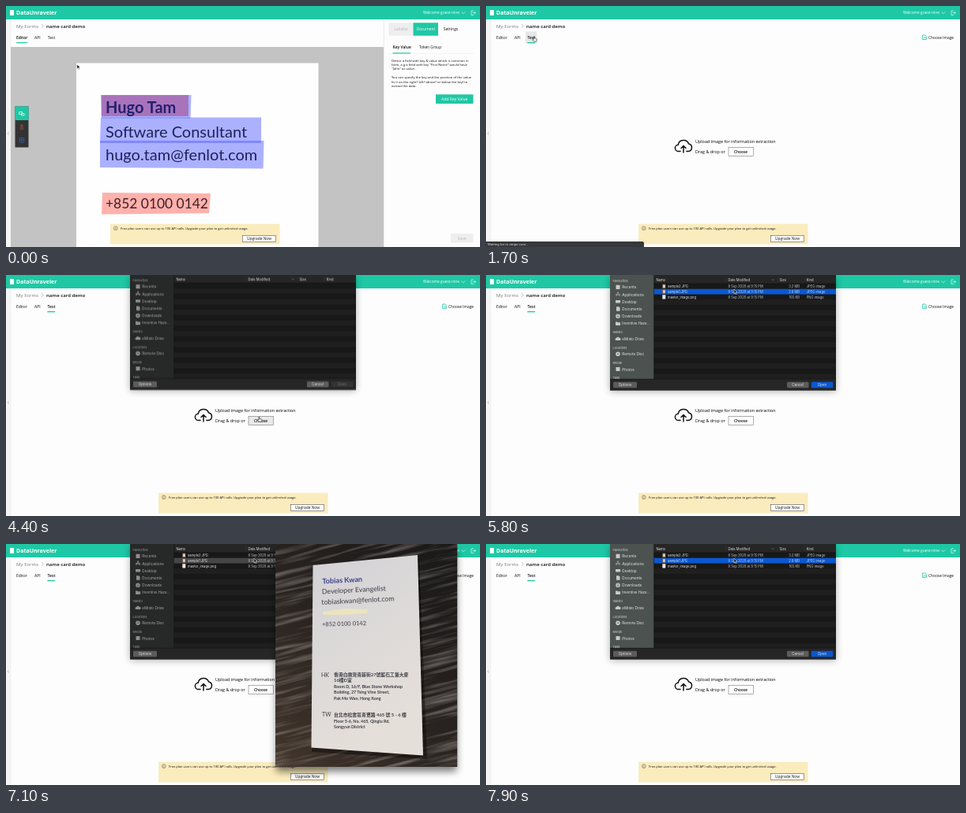
Recreate the animation shown at these times as an HTML page. Size 600x306 px, loop 8000 ms.

```html
<!DOCTYPE html>
<html lang="en">
<head>
<meta charset="utf-8">
<title>Form extraction demo</title>
<style>
html, body { margin: 0; width: 100%; height: 100%; overflow: hidden; background: #fdfdfd; }
svg { display: block; width: 100vw; height: 100vh; }
text { font: 5px "Open Sans", "Noto Sans", sans-serif; fill: #111; }
.b { font-weight: 600; }
.mid { text-anchor: middle; }
.end { text-anchor: end; }
.white { fill: #fff; }
.pale { fill: #b9b9b9; }
.hint { font-size: 4.17px; }
.note { font-size: 4.07px; }
.big { font-size: 5.42px; fill: #000; }
.line { fill: none; stroke-linecap: round; stroke-linejoin: round; }
.card text { font-family: Lato, "Noto Sans CJK TC", sans-serif; font-size: 20px; fill: #20215f; }
.dialog text { font-family: Inter, Roboto, sans-serif; font-size: 4.15px; fill: #e4e4e4; }
.dialog .side text { font-size: 4.7px; fill: inherit; }
.dialog .side .h { font-size: 3.9px; opacity: .85; }
.dialog .btn { font-size: 4.5px; text-anchor: middle; }
.photo text { font-family: Lato, "Noto Sans CJK TC", sans-serif; font-size: 8.8px; fill: #3c3c44; }
.photo .addr text { font-size: 5.35px; font-weight: 700; }
.photo .addr .zh { font-size: 5.85px; }
.photo .addr .tag { font-size: 7px; font-weight: 400; }

/* One loop is 8 s, so 1.25% is 100 ms. */
.step { animation: 8s step-end infinite; }
.glide { animation: 8s ease-in-out infinite; }
.editor { animation-name: editor; }
.test { animation-name: test; }
.status { animation-name: status; }
.dock { animation-name: dock; }
.tabhover { animation-name: tabhover; }
.choosehover { animation-name: choosehover; }
.banner { animation-name: banner; }
.dialog { animation-name: dialog; animation-timing-function: ease-out; }
.files { animation-name: files; }
.side { animation-name: side; }
.panel { animation-name: panel; }
.row { animation-name: row; }
.open { animation-name: open; }
.opentext { animation-name: opentext; }
.photo { animation-name: photo; transform-origin: 228px 21px; }
.cursor { animation-name: cursor; }
.arrow { animation-name: arrow; }
.hand { animation-name: hand; }
@keyframes editor { 0% { opacity: 1 } 21.25%, to { opacity: 0 } }
@keyframes test { 0% { opacity: 0 } 21.25%, to { opacity: 1 } }
@keyframes status { 0% { opacity: 0 } 21.25% { opacity: 1 } 30%, to { opacity: 0 } }
@keyframes dock { 0% { opacity: 0 } 38.75% { opacity: 1 } 52.5%, to { opacity: 0 } }
@keyframes tabhover { 0% { opacity: 0 } 16.25% { opacity: 1 } 32.5%, to { opacity: 0 } }
@keyframes choosehover { 0% { fill: #fff } 47.5% { fill: #e9e9e9 } 57.5%, to { fill: #fff } }
@keyframes banner { 0% { transform: translateX(-61px) } 21.25%, to { transform: none } }
@keyframes dialog {
  0%, 51.25% { transform: translateY(-160px) }
  55% { transform: translateY(-.7px) }
  56.25%, to { transform: none }
}
@keyframes files { 0% { opacity: 0 } 58.75%, to { opacity: 1 } }
@keyframes side { 0% { fill: #a6a9a8 } 68.75% { fill: #e6e8e7 } 85% { fill: #a6a9a8 } 97.5%, to { fill: #e6e8e7 } }
@keyframes panel { 0% { fill: #272929 } 68.75% { fill: #4b524f } 85% { fill: #272929 } 97.5%, to { fill: #4b524f } }
@keyframes row { 0% { fill: transparent } 68.75% { fill: #0a58d0 } 85% { fill: #464646 } 97.5%, to { fill: #0a58d0 } }
@keyframes open { 0% { fill: #333335 } 68.75% { fill: #0a58d0 } 85% { fill: #333335 } 97.5%, to { fill: #0a58d0 } }
@keyframes opentext { 0% { opacity: .35 } 68.75% { opacity: 1 } 85% { opacity: .35 } 97.5%, to { opacity: 1 } }
@keyframes photo {
  0%, 83.75% { transform: scale(.03); opacity: 0 }
  84.5% { opacity: 1 }
  86.25%, 93.75% { transform: none; opacity: 1 }
  95.5% { opacity: 1 }
  96.2%, to { transform: scale(.03); opacity: 0 }
}
@keyframes cursor {
  0%, 11.25% { transform: translate(89.8px, 74px) }
  16.25%, 31.25% { transform: translate(60.8px, 38.5px) }
  36.25%, 37.5% { transform: translate(240px, 139px) }
  43.75%, 45% { transform: translate(319.8px, 177.8px) }
  47.5%, 56.25% { transform: translate(320.4px, 180px) }
  66.25%, to { transform: translate(313.8px, 18px) }
}
@keyframes arrow { 0% { opacity: 1 } 16.25% { opacity: 0 } 32.5% { opacity: 1 } 47.5% { opacity: 0 } 57.5%, to { opacity: 1 } }
@keyframes hand { 0% { opacity: 0 } 16.25% { opacity: 1 } 32.5% { opacity: 0 } 47.5% { opacity: 1 } 57.5%, to { opacity: 0 } }
</style>
</head>
<body>
<svg viewBox="0 0 600 306">
<defs>
  <pattern id="stripes" x="212.5" y="11" width="20" height="13.5" patternUnits="userSpaceOnUse">
    <rect width="20" height="13.5" fill="#181818"/>
    <rect y="6.75" width="20" height="6.75" fill="#1f1f1f"/>
  </pattern>
  <linearGradient id="table" x1="0" y1="1" x2=".8" y2="0">
    <stop offset="0" stop-color="#43362c"/>
    <stop offset=".5" stop-color="#2a2421"/>
    <stop offset="1" stop-color="#1b1919"/>
  </linearGradient>
  <linearGradient id="paper" x2=".4" y2="1">
    <stop offset="0" stop-color="#d2d1d5"/>
    <stop offset=".5" stop-color="#dcd9d8"/>
    <stop offset="1" stop-color="#e5dfd9"/>
  </linearGradient>
  <linearGradient id="fade" x2="0" y2="1">
    <stop offset="0" stop-color="#000" stop-opacity="0"/>
    <stop offset="1" stop-color="#000" stop-opacity=".2"/>
  </linearGradient>
  <filter id="soft" x="-20%" y="-20%" width="140%" height="140%"><feGaussianBlur stdDeviation="5"/></filter>
  <filter id="grain" x="0" y="0" width="1" height="1">
    <feTurbulence type="fractalNoise" baseFrequency=".012 .22" numOctaves="3" seed="4"/>
    <feColorMatrix values="0 0 0 0 .47  0 0 0 0 .43  0 0 0 0 .4  2.4 0 0 0 -1.1"/>
  </filter>
  <clipPath id="frame"><rect x="341" width="230.5" height="283"/></clipPath>
  <clipPath id="sideclip"><rect x="157" width="56" height="132"/></clipPath>
</defs>

<!-- page shell -->
<rect width="600" height="306" fill="#fdfdfd"/>
<rect y="17" width="6" height="289" fill="#f5f5f5"/>
<path d="M6 17V306" stroke="#e9e9e9" stroke-width=".5"/>
<path class="line" d="M3.4 160.6 2.2 162 3.4 163.4" stroke="#888" stroke-width=".5"/>
<rect width="600" height="17" fill="#1fc8a5"/>
<rect class="white" x="5" y="5" width="5" height="7"/>
<text class="white" x="13" y="11.4" style="font-size:7px;font-weight:700">DataUnraveler</text>
<text class="white" x="528" y="10.4" style="font-size:4.85px">Welcome guest-nine</text>
<path class="line" d="M576.8 7.8 578.8 9.8 580.8 7.8" stroke="#fff" stroke-width=".6"/>
<path class="line" d="M591.5 6H589V11.5H591.5M591 8.7H594.3M593 7.3 594.4 8.7 593 10.1" stroke="#fff" stroke-width=".6"/>
<text x="13" y="27.5" style="font-size:6.1px;fill:#777">My Forms</text>
<path class="line" d="M45.2 23.4 47.2 25.5 45.2 27.6" stroke="#999" stroke-width=".6"/>
<text class="b" x="51" y="27.5" style="font-size:6.05px">name card demo</text>
<rect class="step tabhover" x="50" y="32.3" width="14.3" height="15" fill="#e7e7e7"/>
<text x="36" y="41.7">API</text>

<!-- editor -->
<g class="step editor">
  <text class="b" x="13" y="41.7">Editor</text>
  <text x="52.8" y="41.7">Test</text>
  <rect x="13" y="46" width="14" height="1.2" fill="#1fc8a5"/>
  <rect x="6" y="52" width="472" height="254" fill="#c3c3c3"/>
  <rect x="89" y="72.5" width="306.5" height="233.5" fill="#fefefe"/>
  <g class="card">
    <g fill="rgb(77,90,255)" fill-opacity=".47">
      <path d="M120 113H234.5L233.5 142.5H121Z"/>
      <path d="M120 141.5H323V174H119Z"/>
      <path d="M119 171H326.5L325.5 206.5 119 205Z"/>
    </g>
    <path d="M121.5 113.5H230.5V139.5H121Z" fill="#a873bb" stroke="#76508e" stroke-width=".5" stroke-dasharray="1.5 1"/>
    <path d="M122 237 259 238 257 263 121 264.5Z" fill="#ffb1ac"/>
    <text x="126" y="136" style="font-weight:700;fill:#23206f">Hugo Tam</text>
    <text x="126" y="166.5">Software Consultant</text>
    <text x="126" y="195.5">hugo.tam@fenlot.com</text>
    <text x="126" y="257" style="font-size:17.4px;fill:#3b2026">+852 0100 0142</text>
  </g>
  <rect x="11.5" y="127.5" width="17" height="52" fill="#333"/>
  <rect x="11.5" y="127.5" width="17" height="17.5" fill="#1fc8a5"/>
  <g class="line" stroke-width=".7">
    <path d="M17 134.5H20.5V137.5H17ZM20 136.5H23V139H20Z" stroke="#fff"/>
    <path d="M18.5 156 19 153H21L21.5 156ZM19 151.5A1 1 0 0 1 21 151.5 1 1 0 0 1 19 151.5" stroke="#b9503c"/>
    <path d="M17.2 167.5H22.8V173H17.2ZM20 167.5V173M17.2 170.2H22.8" stroke="#3d62b5" stroke-dasharray="1 .8"/>
  </g>
  <!-- settings panel -->
  <rect x="478" y="17" width="122" height="289" fill="#fdfdfd"/>
  <path d="M478.3 17V306" stroke="#ddd" stroke-width=".6"/>
  <rect x="484.5" y="21.3" width="31" height="16.4" fill="#eee"/>
  <rect x="515.5" y="21.3" width="31.5" height="16.4" fill="#1fc8a5"/>
  <text class="mid pale" x="500.3" y="31.2" style="font-size:4.8px">Labeller</text>
  <text class="mid white" x="531.4" y="31.2" style="font-size:4.8px">Document</text>
  <text class="mid" x="563" y="31.2">Settings</text>
  <text class="b" x="489.5" y="54.4">Key Value</text>
  <text x="523" y="54.4" style="font-size:4.7px">Token Group</text>
  <path d="M484 60.5H592" stroke="#e8e8e8" stroke-width=".5"/>
  <rect x="489.5" y="59.3" width="22.5" height="1.2" fill="#1fc8a5"/>
  <text class="hint" x="488" y="70.7">Detect a field with key &amp; value which is common in</text>
  <text class="hint" x="488" y="76">form, e.g a field with key "First Name" would have</text>
  <text class="hint" x="488" y="81.3">"John" as value.</text>
  <text class="hint" x="488" y="92.4">You can specify the key and the position of the value</text>
  <text class="hint" x="488" y="97.7">(is it on the right? left? above? or below the key) to</text>
  <text class="hint" x="488" y="103">extract the data.</text>
  <rect x="544" y="112.3" width="47.5" height="11.7" fill="#1fc8a5"/>
  <text class="mid white" x="567.8" y="120">Add Key Value</text>
  <rect x="563" y="289" width="28.5" height="11.5" fill="#eee"/>
  <text class="mid pale" x="577.2" y="296.6">Save</text>
</g>

<!-- test page -->
<g class="step test">
  <text x="13" y="41.7">Editor</text>
  <text class="b" x="52.6" y="41.7">Test</text>
  <rect x="52.3" y="46" width="9.8" height="1.3" fill="#1fc8a5"/>
  <path class="line" d="M553 37H556L557.3 38.3V42.5H553ZM554 41.3 555.4 39.6 557 41.3" stroke="#1fc8a5" stroke-width=".8"/>
  <text x="560" y="41.7" style="font-size:4.83px">Choose Image</text>
  <path class="line" d="M246 184.5H243.8A4 4 0 0 1 243.2 176.3 7 7 0 0 1 256.6 175 4.8 4.8 0 0 1 256 184.5H253.8M250 186V178M247 180.5 250 177.5 253 180.5" stroke="#111" stroke-width="1.5"/>
  <text class="big" x="265" y="174">Upload image for information extraction</text>
  <text class="big" x="265" y="186.5">Drag &amp; drop or</text>
  <rect class="step choosehover" x="307" y="179.3" width="31.3" height="11" stroke="#777" stroke-width=".6"/>
  <text class="b mid" x="322.5" y="186.5" style="font-size:4.75px">Choose</text>
</g>

<rect class="step dock" x="153" y="302" width="292" height="4" fill="url(#fade)"/>

<!-- plan notice -->
<g class="step banner">
  <rect x="193" y="276.7" width="214.5" height="25.8" fill="#fbecbd"/>
  <circle cx="199.8" cy="282.2" r="2.4" fill="none" stroke="#444" stroke-width=".5"/>
  <path d="M199.8 281.7V283.7M199.8 280.6V281.2" stroke="#444" stroke-width=".6"/>
  <text class="note" x="206" y="283.9">Free plan users can use up to 100 API calls. Upgrade your plan to get unlimited usage.</text>
  <rect class="white" x="360.3" y="291.4" width="42.4" height="8.2" stroke="#555" stroke-width=".6"/>
  <text class="mid" x="381.5" y="297.3" style="font-size:4.85px">Upgrade Now</text>
</g>

<g class="step status">
  <path d="M0 299H198Q200 299 200 301V306H0Z" fill="#37383b"/>
  <text x="2" y="304.3" style="font:4.4px Roboto,sans-serif;fill:#ddd">Waiting for m.stripe.com...</text>
</g>

<!-- file dialog -->
<g class="glide dialog">
  <rect x="157" y="2" width="286" height="146" filter="url(#soft)" opacity=".3"/>
  <rect x="157" y="-20" width="286" height="166.7" fill="#262627"/>
  <rect x="212.5" y="11" width="230.5" height="121" fill="url(#stripes)"/>
  <rect class="step panel" x="157" y="-20" width="55.5" height="152"/>
  <path d="M157 132.2H443M212.7 0V132M212.5 10.8H443" stroke="#111" stroke-width=".5"/>
  <path d="M304 3V9M369 3V9M403.5 3V9" stroke="#444" stroke-width=".4"/>
  <g clip-path="url(#sideclip)">
  <g class="step side">
    <text class="h" x="160.5" y="8.6">Favourites</text>
    <text x="172.3" y="17.3">Recents</text>
    <text x="172.3" y="26.5">Applications</text>
    <text x="172.3" y="35.8">Desktop</text>
    <text x="172.3" y="45">Documents</text>
    <text x="172.3" y="54.2">Downloads</text>
    <text x="172.3" y="63.4" style="font-size:4.5px">Inventive Haze...</text>
    <text class="h" x="160.5" y="74.4">eMisto</text>
    <text x="172.3" y="82.8">eMisto Drive</text>
    <text class="h" x="160.5" y="93.6">Locations</text>
    <text x="172.3" y="102.2">Remote Disc</text>
    <text class="h" x="160.5" y="112.6">Media</text>
    <text x="172.3" y="121.5">Photos</text>
    <text class="h" x="160.5" y="132.2">Tags</text>
    <g opacity=".8">
      <path d="M164.5 12.7H169.5V18H164.5ZM164 32H170V35.5H164ZM165 40.2H168.2L169.5 41.5V45.8H165ZM164 59.5H166.2L167 60.3H170V64H164ZM164.5 117H169.5V122H164.5Z"/>
      <path class="line" d="M167 21.8 164.8 26.7M167 21.8 169.2 26.7M164.2 25H169.8" stroke="#ccc" stroke-width=".7"/>
      <circle cx="167" cy="52.2" r="2.8"/>
      <path d="M165 83A1.5 1.5 0 0 1 165 80 2.3 2.3 0 0 1 169 80 1.5 1.5 0 0 1 169.3 83Z"/>
      <circle cx="167" cy="100.3" r="2.8"/>
      <path d="M167 50.5V53.5M165.7 52.4 167 53.7 168.3 52.4" fill="none" stroke="#444" stroke-width=".6"/>
      <circle cx="167" cy="100.3" r=".8" fill="#444"/>
    </g>
  </g>
  </g>
  <text x="215.5" y="7.5">Name</text>
  <text x="306.5" y="7.5">Date Modified</text>
  <path class="line" d="M362 5.6 363 6.6 364 5.6" stroke="#aaa" stroke-width=".5"/>
  <text x="371.5" y="7.5">Size</text>
  <text x="405.7" y="7.5">Kind</text>
  <rect class="step row" x="212.8" y="17.75" width="230.2" height="6.75"/>
  <g class="step files">
    <path d="M223.3 11.8H227.3V17.1H223.3ZM223.3 18.5H227.3V23.8H223.3Z" fill="#8a6a52"/>
    <path d="M224.3 12.5H226.5V16H224.3ZM224.3 19.2H226.5V22.8H224.3ZM223.3 25.2H227.3V30.5H223.3Z" fill="#e8e8ea"/>
    <text x="230" y="16">sample2.JPG</text>
    <text x="230" y="22.7">sample1.JPG</text>
    <text x="230" y="29.5">master_image.png</text>
    <g opacity=".85">
      <text x="306.5" y="16">8 Sep 2020 at 9:15 PM</text>
      <text x="306.5" y="22.7">8 Sep 2020 at 9:15 PM</text>
      <text x="306.5" y="29.5">8 Sep 2020 at 9:15 PM</text>
      <text class="end" x="397" y="16">3.2 MB</text>
      <text class="end" x="397" y="22.7">2.8 MB</text>
      <text class="end" x="397" y="29.5">165 KB</text>
      <text x="405.7" y="16">JPEG image</text>
      <text x="405.7" y="22.7">JPEG image</text>
      <text x="405.7" y="29.5">PNG image</text>
    </g>
  </g>
  <g fill="#5c5c5e">
    <rect x="161" y="135.7" width="30" height="7.6" rx="1.3"/>
    <rect x="381" y="135.7" width="27.5" height="7.6" rx="1.3"/>
  </g>
  <rect class="step open" x="411.8" y="135.7" width="27.5" height="7.6" rx="1.3"/>
  <text class="btn" x="176" y="141.1">Options</text>
  <text class="btn" x="394.7" y="141.1">Cancel</text>
  <text class="btn step opentext" x="425.5" y="141.1">Open</text>
</g>

<!-- photo preview -->
<g class="glide photo">
  <rect x="342" y="8" width="228.5" height="281" filter="url(#soft)" opacity=".5"/>
  <g clip-path="url(#frame)">
    <rect x="341" width="230.5" height="283" fill="url(#table)"/>
    <rect x="270" y="-60" width="380" height="400" filter="url(#grain)" opacity=".5" transform="rotate(-14 456 142)"/>
    <path d="M389 31 523 19 533 273 387 264Z" fill="#000" opacity=".4"/>
    <path d="M388.5 27 521 14 528 268.5 386.5 258.5Z" fill="url(#paper)"/>
    <path d="M401 86 430 82 458 83 457 88 425 90 402 90Z" fill="#ebe4bf"/>
    <text transform="translate(400.5 50.5) rotate(-3)" style="font-size:9.1px;fill:#3c3f8c;font-weight:700">Tobias Kwan</text>
    <text transform="translate(400 63.5) rotate(-3)">Developer Evangelist</text>
    <text transform="translate(399.5 77) rotate(-3)">tobiaskwan@fenlot.com</text>
    <text transform="translate(400 104.5) rotate(-1.5)" style="font-size:7.5px">+852 0100 0142</text>
    <g class="addr">
      <text class="tag" x="399" y="168.5">HK</text>
      <text class="zh" x="415" y="167.5">香港白霧灣青藤街27號藍石工藝大廈</text>
      <text class="zh" x="415" y="175.4">16樓D室</text>
      <text x="415" y="183">Room D, 16/F, Blue Stone Workshop</text>
      <text x="415" y="190.4">Building, 27 Tsing Vine Street,</text>
      <text x="415" y="197.8">Pak Mo Wan, Hong Kong</text>
      <text class="tag" x="400" y="219.2">TW</text>
      <text class="zh" x="415" y="219">台北市松雲區青鷺路 465 號 5 - 6 樓</text>
      <text x="415" y="227">Floor 5-6, No. 465, Qinglu Rd,</text>
      <text x="415" y="234.4">Songyun District</text>
    </g>
  </g>
</g>

<!-- pointer -->
<g class="glide cursor" stroke-linejoin="round">
  <path class="step arrow" d="M0 0V5.8L1.4 4.6 2.3 6.6 3.2 6.2 2.3 4.2H4.1Z" fill="#111" stroke="#fff" stroke-width=".5"/>
  <path class="step hand" d="M-.6 .4Q0-.4 .5 .4V2.6L3 3.1Q3.6 3.3 3.5 4L3 6.6H-.3L-2 4.2Q-2 3.2-.6 4.2Z" fill="#fff" stroke="#111" stroke-width=".6"/>
</g>
</svg>
</body>
</html>
```
